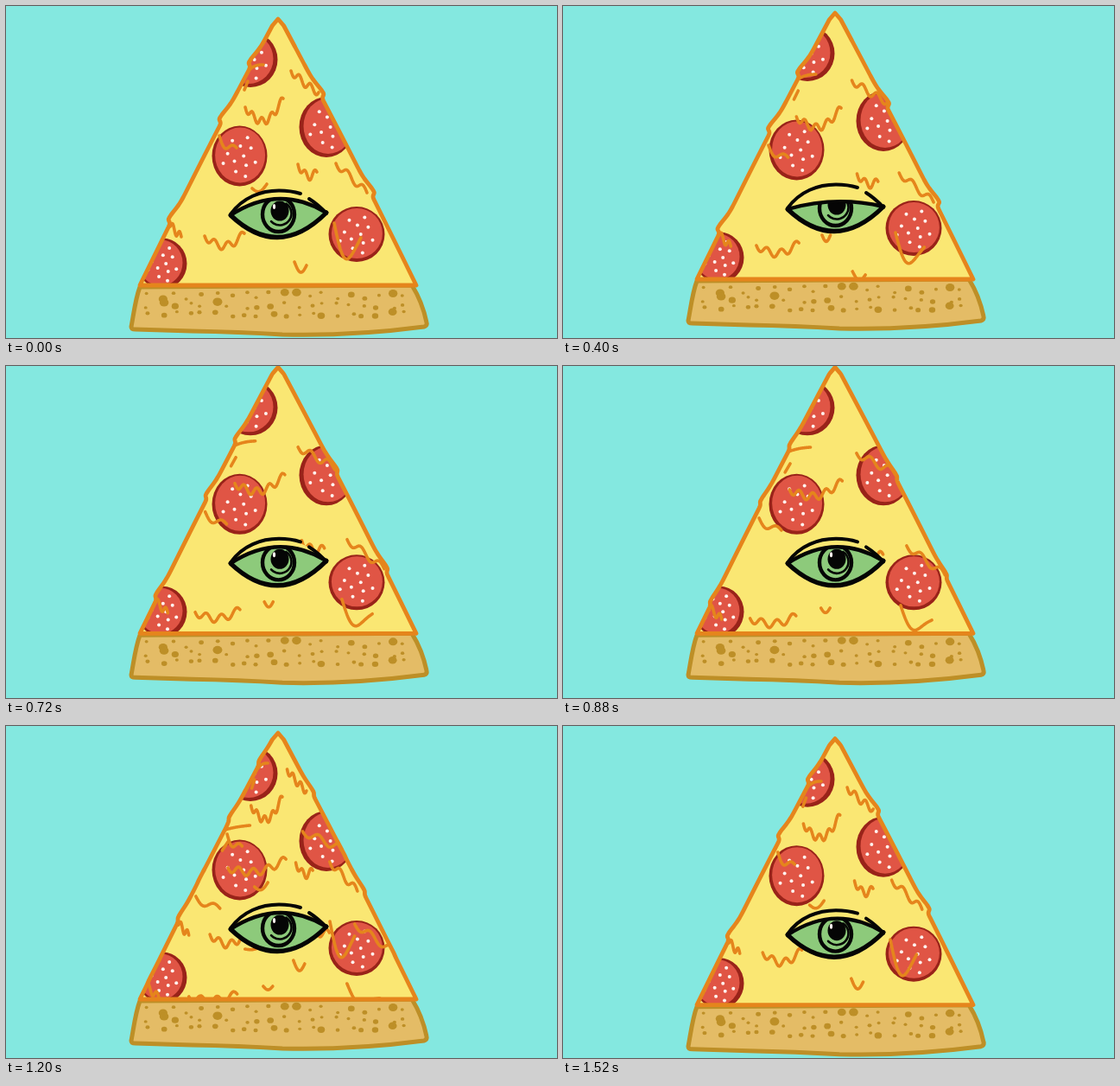
An HTML page with a canvas for the animation above (1.6 s loop, 638 by 384 pixels).

```html
<!DOCTYPE html>
<html lang="en">
<head>
<meta charset="utf-8">
<title>Pizza eye</title>
<style>
  html, body { margin: 0; width: 100%; height: 100%; overflow: hidden; background: #84e8e0; }
  canvas { display: block; }
</style>
</head>
<body>
<canvas id="stage" width="638" height="384"></canvas>
<script>
const ctx = document.getElementById('stage').getContext('2d');
const LOOP = 1600, STEP = 80;
const APEX = { x: 315, y: 15 }, BASE = 323;
const BORN = -720, DEAD = 1240, SPEED = .045;
const C = {
  sky: '#84e8e0', cheese: '#fae773', melt: '#e5851c', crust: '#e4bc66', rim: '#bd8f27',
  meat: '#e05545', skin: '#992319', dot: '#fff3ef', green: '#8dca7b', ink: '#050505'
};

// shade: side the dark rim leans to
const slices = [
  { x: 283, y: 62, rx: 31.5, ry: 32, shade: 1 },
  { x: 371, y: 140, rx: 31.5, ry: 35, shade: -1 },
  { x: 270.5, y: 173.5, rx: 32, ry: 35, shade: -.3 },
  { x: 406, y: 264, rx: 32.5, ry: 32, shade: -.2 },
  { x: 181, y: 298, rx: 28.5, ry: 29.5, shade: 1 }
];

// melted cheese as it lies when the loop starts
const drips = [
  { x: 277, y: 117, w: 44, tilt: -10, sag: 21, waves: 4 },
  { x: 330, y: 75, w: 32, tilt: 25, sag: 2, waves: 2.5 },
  { x: 338, y: 183, w: 22, tilt: 9, sag: 9, waves: 2 },
  { x: 382, y: 182, w: 36, tilt: 34, sag: 0, waves: 2 },
  { x: 380, y: 251, w: 31, tilt: 17, sag: 33, waves: 1 },
  { x: 247, y: 150, w: 20, tilt: 14, sag: 7, waves: 1 },
  { x: 230, y: 266, w: 46, tilt: -3, sag: 13, waves: 3 },
  { x: 187, y: 247, w: 16, tilt: 20, sag: 2, waves: 2 },
  { x: 281, y: 74, w: 17, tilt: -6, sag: -2, waves: 0 },
  { x: 276, y: 97, w: 4, tilt: -10, sag: 0, waves: 0 },
  { x: 285, y: 211, w: 17, tilt: -5, sag: 6, waves: 0 },
  { x: 301, y: 254, w: 9, tilt: 0, sag: 9, waves: 0 },
  { x: 334, y: 296, w: 14, tilt: 4, sag: 10, waves: 0 }
];

// heights of the bulges on each side when the loop starts
const bulges = { left: [65, 130, 246], right: [101, 215] };

// ages of the copies of a flowing thing alive at loop time t
const ages = t => [t - LOOP, t].filter(a => a > BORN && a < DEAD);

function random(seed) {
  return () => (seed = seed * 16807 % 2147483647) / 2147483647;
}

function trace(points) {
  const path = new Path2D();
  for (const [x, y] of points) path.lineTo(x, y);
  return path;
}

function stroke(path, color, width) {
  ctx.strokeStyle = color;
  ctx.lineWidth = width;
  ctx.stroke(path);
}

function fill(path, color) {
  ctx.fillStyle = color;
  ctx.fill(path);
}

function oval(x, y, rx, ry = rx) {
  const path = new Path2D();
  path.ellipse(x, y, rx, ry, 0, 0, 2 * Math.PI);
  return path;
}

function clipped(path, draw) {
  ctx.save();
  ctx.clip(path);
  draw();
  ctx.restore();
}

// points from the tip down one side; bulges swell, slide down and shrink
function side(t, name) {
  const sign = name === 'left' ? -1 : 1, points = [];
  const height = BASE - APEX.y;
  for (let y = APEX.y; y <= BASE; y++) {
    const k = (y - APEX.y) / height;
    let x = 157.5 * k + 2.5 * Math.min(1, k * 40) + 2 * Math.sin(Math.PI * k);
    for (const start of bulges[name]) for (const age of ages(t)) {
      const d = y - start - SPEED * age;
      const size = 5 * Math.sin(Math.PI * (age - BORN) / (DEAD - BORN));
      x += size * Math.exp(-((d / (d < 0 ? 13 : 4)) ** 2));
    }
    points.push([APEX.x + sign * x, y]);
  }
  return points;
}

// a drip slides down, spreads away from the tip and flattens
function dripPath({ x, y, w, tilt, sag, waves }, age) {
  const fall = SPEED * age, spread = 1 + fall / (y - APEX.y);
  const depth = sag * (1 - Math.max(0, age) / 2200);
  const points = [];
  for (let u = 0; u <= 1.001; u += 1 / 40) {
    const ripple = 4.5 * Math.sin(2 * Math.PI * waves * u);
    points.push([
      APEX.x + (x + w * u - APEX.x) * spread,
      y + fall + tilt * u + depth * Math.sin(Math.PI * u) + ripple
    ]);
  }
  return trace(points);
}

const crust = new Path2D('M155 325C150 338 148 355 145 371Q145 374 150 374Q185 375 215 376Q270 377 320 380Q400 382 484 371Q488 370 487 366Q482 342 470 323Z');

function drawCrust() {
  const rnd = random(77);
  fill(crust, C.crust);
  for (let col = 0; col < 20; col++) {
    for (let row = 0; row < 3; row++) {
      const r = 1.8 + 3.2 * rnd() ** 4;
      const x = 166 + col * 15.6 + 9 * (rnd() - .5);
      const y = 335 + row * 11 + 8 * (rnd() - .5);
      fill(oval(x, y, r * 1.1, r * .95), C.rim);
    }
  }
  stroke(crust, C.rim, 5);
}

function drawSlice({ x, y, rx, ry, shade }) {
  fill(oval(x, y, rx, ry), C.skin);
  fill(oval(x - 2 * shade, y - 1, rx - 3, ry - 3), C.meat);
  for (let i = 0; i < 12; i++) {
    const a = i * 2.4, r = .72 * Math.sqrt((i + .5) / 12);
    fill(oval(x + r * rx * Math.cos(a), y + r * ry * Math.sin(a), 2), C.dot);
  }
}

const arc = mid => `Q315.5 ${2 * mid - 240.5}`;
const lower = new Path2D(`M260 242${arc(267.5)} 371 239`);
const crease = new Path2D('M260 241C274 221 296 213.5 316 213.5Q330 213.5 341 217M351 223Q362 230 371 240');

function drawEye(t) {
  const blink = t < 480 ? Math.sin(Math.PI * t / 480) ** 2 : 0;
  const lid = `M260 242${arc(223 + 41 * blink)} 371 239`;
  const ball = new Path2D(`${lid}${arc(267.5)} 260 242Z`);
  fill(new Path2D(`M260 242${arc(214)} 371 239${arc(267.5)} 260 242Z`), C.cheese);
  fill(ball, C.green);
  clipped(ball, () => {
    stroke(oval(315.5, 241, 18.5, 20), C.ink, 4.4);
    const ring = new Path2D();
    ring.arc(317, 240, 13.5, -1, 2.4);
    stroke(ring, C.ink, 2.6);
    fill(oval(317, 237, 10.5, 11.5), C.ink);
    fill(oval(310.5, 232, 1.6, 3), C.dot);
  });
  stroke(lower, C.ink, 5.2);
  stroke(new Path2D(lid), C.ink, 4.4);
  stroke(crease, C.ink, 4);
}

function draw(t) {
  ctx.fillStyle = C.sky;
  ctx.fillRect(0, 0, 638, 384);
  ctx.save();
  ctx.lineCap = ctx.lineJoin = 'round';
  ctx.translate(0, -7 * (1 - Math.cos(t / LOOP * 2 * Math.PI)));
  drawCrust();
  const body = trace([...side(t, 'left').reverse(), ...side(t, 'right')]);
  body.closePath();
  fill(body, C.cheese);
  clipped(body, () => {
    slices.forEach(drawSlice);
    for (const drip of drips) for (const age of ages(t)) stroke(dripPath(drip, age), C.melt, 3.6);
  });
  stroke(body, C.melt, 4.8);
  drawEye(t);
  ctx.restore();
}

const start = performance.now();
function tick() {
  const t = (performance.now() - start) % LOOP;
  draw(Math.floor(t / STEP) * STEP);
  requestAnimationFrame(tick);
}
tick();
</script>
</body>
</html>
```
